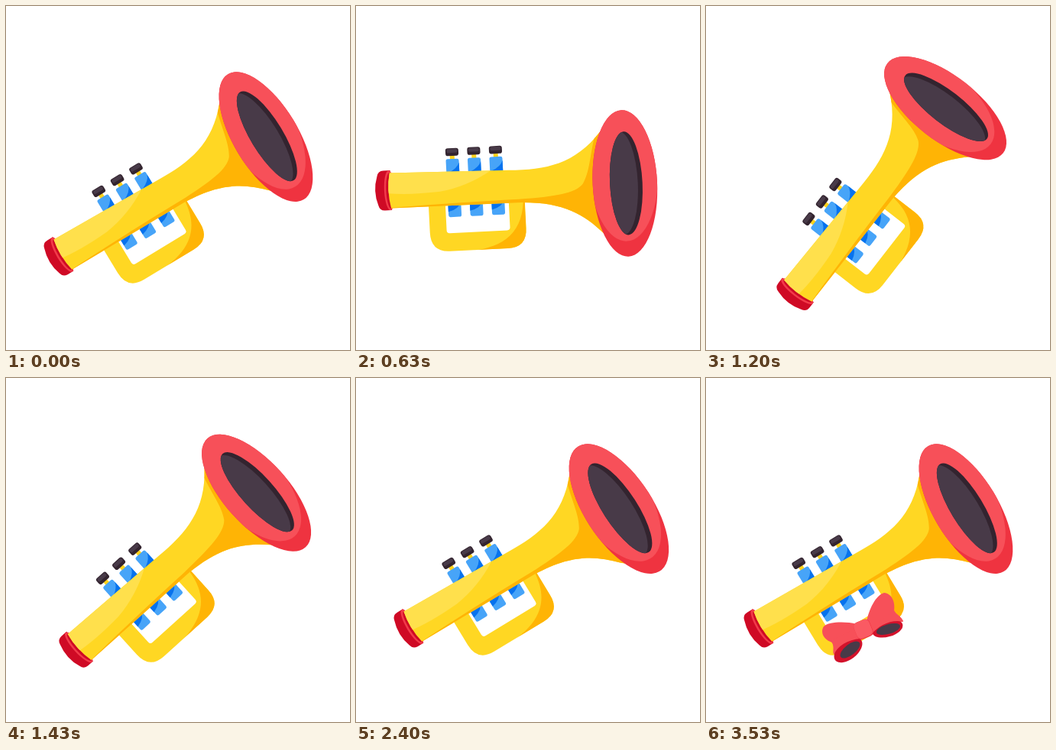
Write an HTML page that moves like this. It is 450 by 450 pixels and loops after 3.56 s.

```html
<!DOCTYPE html>
<html lang="en">
<head>
<meta charset="utf-8">
<title>Trumpet</title>
<style>
  html, body { margin: 0; width: 100%; height: 100%; overflow: hidden; background: #fff; }
  svg { display: block; width: 100vw; height: 100vh; }
</style>
</head>
<body>
<svg viewBox="0 0 450 450" xmlns="http://www.w3.org/2000/svg">
  <defs>
    <path id="tube" d="M-181 -15.500 L-25 -11.500 C24 -9.500 62 -15 97 -56 L128 -82 V104 L95 77 C70 51 45 34 -10 31.500 L-181 30.500 Q-186 7 -181 -15.500Z"/>
    <path id="grip" clip-rule="evenodd" fill-rule="evenodd"
      d="M-132 20 V65 Q-132 90.500 -107 90.500 H-31 Q-6 90.500 -6 65 V20Z M-110 20 V63 q0 4 4 4 H-31 q4 0 4 -4 V20Z"/>
    <ellipse id="rim" cx="126" cy="13.300" rx="42.200" ry="95.800"/>
    <ellipse id="hole" cx="127.600" cy="13.300" rx="21.300" ry="67.600"/>
    <clipPath id="inTube"><use href="#tube"/></clipPath>
    <clipPath id="inGrip"><use href="#grip" clip-rule="evenodd"/></clipPath>
    <clipPath id="inRim"><use href="#rim"/></clipPath>
    <clipPath id="inHole"><use href="#hole"/></clipPath>
    <g id="valve">
      <rect x="-3" y="-36" width="6" height="10" fill="#ffd21c"/>
      <rect x="-8.500" y="-44" width="17" height="10" rx="3" fill="#33242f"/>
      <rect x="-7" y="-43" width="14" height="5" rx="2" fill="#483a48"/>
      <rect x="-8.500" y="-30" width="17" height="24" rx="2.500" fill="#47a4f8"/>
      <path d="M8.500 -25 Q6 -17 -6 -12 V-6 H8.500Z" fill="#0672ee"/>
      <rect x="-8.500" y="26" width="17" height="20" rx="2.500" fill="#47a4f8"/>
      <path d="M-8.500 26 H8.500 Q6 36 -8.500 39Z" fill="#0672ee"/>
    </g>
  </defs>

  <g id="horn">
    <use href="#grip" fill="#ffd723"/>
    <path clip-path="url(#inGrip)" fill="#ffb405" d="M-84 92 C-45 90 -12 78 -8 30 H0 V95Z"/>
    <use href="#valve" x="-98"/>
    <use href="#valve" x="-69.500"/>
    <use href="#valve" x="-41"/>
    <path fill="#cf0a25" d="M-180 -19 H-189 Q-196 -19 -197.500 -12 Q-204 7 -197.500 26 Q-196 33 -189 33 H-180Z"/>
    <ellipse cx="-182" cy="7" rx="7" ry="26" fill="#f23b4a"/>
    <ellipse cx="-181" cy="7.500" rx="5.500" ry="23.500" fill="#cf0a25"/>
    <use href="#tube" fill="#ffd723"/>
    <g clip-path="url(#inTube)">
      <path fill="#ffe04c" d="M-190 -20 V10 Q-160 15 -116 12 Q-80 7 -49 -12 V-20Z"/>
      <path fill="#ffb405" d="M-181 30 Q-90 27 -14 27 C35 26 61 23 71 11 C81 -4 82 -26 91 -56 H130 V110 H60 L-20 36 H-181Z"/>
    </g>
  </g>

  <g id="bell">
    <use href="#rim" fill="#ef3340"/>
    <ellipse clip-path="url(#inRim)" cx="125" cy="-4" rx="45" ry="93" fill="#f75059"/>
    <use href="#hole" fill="#33242f"/>
    <ellipse clip-path="url(#inHole)" cx="121.600" cy="13" rx="21.300" ry="67.600" fill="#483a48"/>
  </g>

  <g id="bow">
    <path fill="#f75059" d="M197 322 C182 318 160 319 154 325 C149 333 154 342 165 346 C169 351 165 358 169 362 L204 342Z"/>
    <ellipse cx="186" cy="356" rx="21.500" ry="12" transform="rotate(-38 186 356)" fill="#d3122b"/>
    <path fill="#f75059" d="M163 344 C169 350 165 356 167 362 C172 351 185 342 202 341 L190 330Z"/>
    <ellipse cx="188.500" cy="355.500" rx="15.500" ry="7" transform="rotate(-38 188.500 355.500)" fill="#483a48"/>
    <path fill="#f75059" d="M210 319 C213 303 222 284 233 281 C243 282 248 293 246 305 C249 310 255 311 258 318 L217 336Z"/>
    <ellipse cx="237.500" cy="328" rx="20.500" ry="10.500" transform="rotate(-16 237.500 328)" fill="#d3122b"/>
    <path fill="#f75059" d="M212 330 L246 304 C249 310 255 311 258 319 C243 315 225 324 217 335Z"/>
    <ellipse cx="238.500" cy="328.500" rx="16" ry="6.300" transform="rotate(-16 238.500 328.500)" fill="#483a48"/>
    <g transform="rotate(-22 206 329)">
      <rect x="195" y="317" width="22" height="23.500" rx="6" fill="#ef3340"/>
      <rect x="195" y="317" width="21.500" height="22.500" rx="6" fill="#fa5a63"/>
    </g>
  </g>
</svg>
<script>
  const LOOP = 3560, TILT = -31.2;
  const [horn, bell, bow] = ['horn', 'bell', 'bow'].map(id => document.getElementById(id));

  // [time in ms, value] pairs
  const swing = [[0, 0], [600, 28.35], [1170, -21], [1700, 0]];
  const stretch = [[1700, 1], [1950, 1.065], [2200, 1], [2450, 1.065], [2700, 1]];
  const pop = [[2600, 0], [2900, 1]];

  const ease = p => p < 0.5 ? 4 * p ** 3 : 1 - 4 * (1 - p) ** 3;

  function valueAt(keys, t) {
    if (t <= keys[0][0]) return keys[0][1];
    for (let i = 1; i < keys.length; i++) {
      const [t0, a] = keys[i - 1], [t1, b] = keys[i];
      if (t < t1) return a + (b - a) * ease((t - t0) / (t1 - t0));
    }
    return keys[keys.length - 1][1];
  }

  const scaleAt = (x, y, sx, sy) => `translate(${x} ${y}) scale(${sx} ${sy}) translate(${-x} ${-y})`;

  function draw(t) {
    const pose = `translate(225.3 225) rotate(${TILT + valueAt(swing, t)})`;
    const size = valueAt(pop, t);
    horn.setAttribute('transform', pose);
    bell.setAttribute('transform', scaleAt(277, 0, valueAt(stretch, t), 1) + ' ' + pose);
    bow.setAttribute('transform', scaleAt(205, 328, size, size));
    bow.setAttribute('visibility', size > 0 ? 'visible' : 'hidden');
  }

  const start = performance.now();
  function tick() {
    draw((performance.now() - start) % LOOP);
    requestAnimationFrame(tick);
  }
  tick();
</script>
</body>
</html>
```
